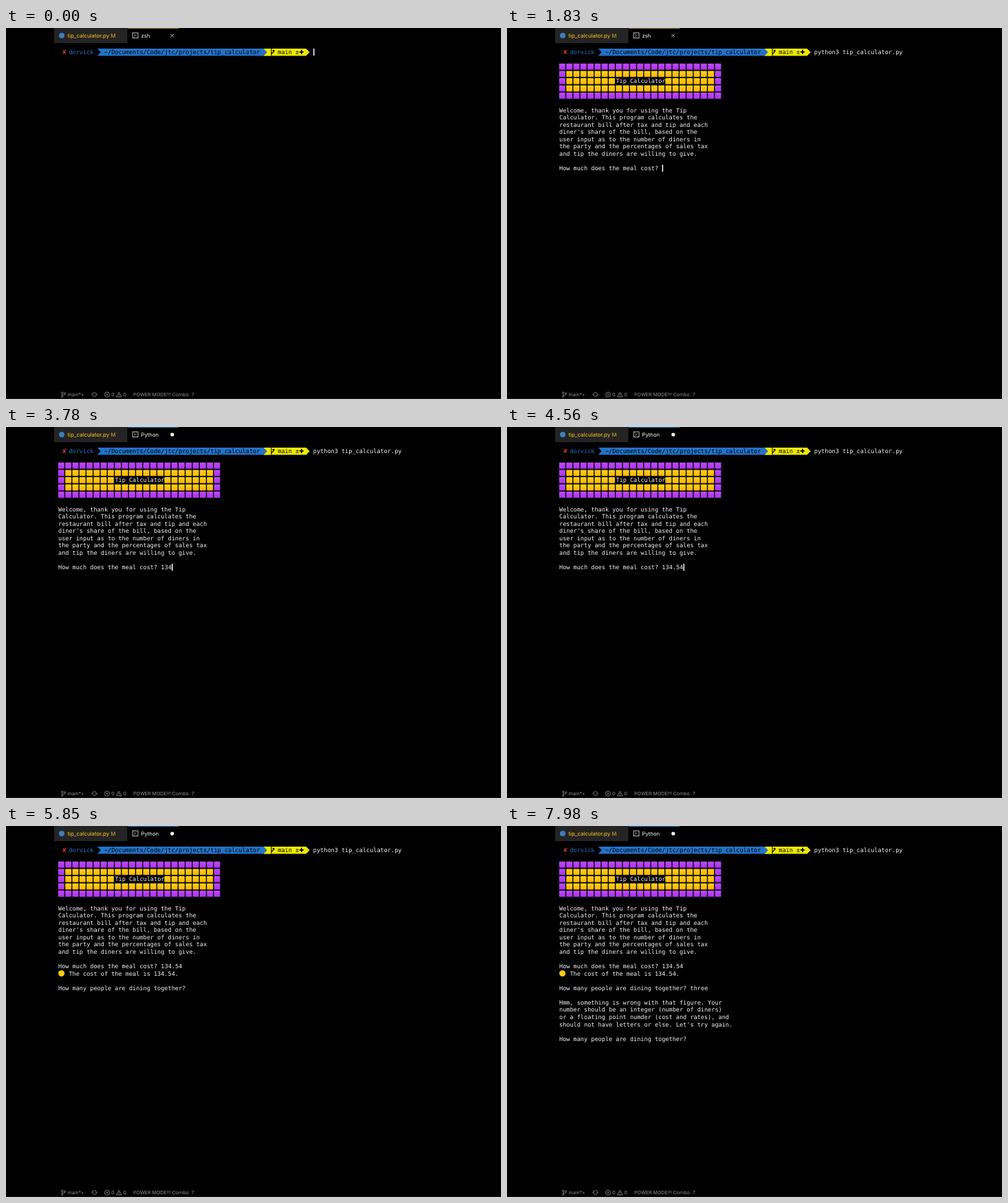
Write an HTML page that moves like this. It is 720 by 540 pixels and loops after 8000 ms.

```html
<!DOCTYPE html>
<html lang="en">
<head>
<meta charset="utf-8">
<title>Tip calculator in a terminal</title>
<style>
  html, body { margin: 0; width: 100%; height: 100%; overflow: hidden; background: #000; }
  svg { display: block; width: 720px; height: 540px; }
  text { white-space: pre; text-rendering: geometricPrecision; }
  .mono { font: 8.555px "DejaVu Sans Mono", monospace; fill: #f4f4f4; }
  .tab { font: 7.7px Inter, sans-serif; fill: #fff; }
  .file { font-size: 7.92px; fill: #fcc91c; }
  .status { font: 7.05px Inter, sans-serif; fill: #929292; }
  .icon { fill: none; stroke: #929292; stroke-width: .8; }
  .white { stroke: #e8e8e8; }
</style>
</head>
<body>
<svg id="stage" viewBox="0 0 720 540">
  <defs>
    <linearGradient id="purple" x2="0" y2="1">
      <stop stop-color="#bd4bff"/><stop offset="1" stop-color="#aa32ec"/>
    </linearGradient>
    <linearGradient id="gold" x2="0" y2="1">
      <stop stop-color="#ffd21c"/><stop offset="1" stop-color="#f7b500"/>
    </linearGradient>
  </defs>

  <!-- tabs -->
  <rect x="70" width="106.5" height="22" fill="#242424"/>
  <circle cx="81" cy="11" r="4" fill="#3f7db5"/>
  <text class="tab file" x="89.5" y="13.8">tip_calculator.py</text>
  <text class="tab" x="152.4" y="13.6" style="fill:#e0b01c">M</text>
  <rect id="edge" x="177" width="74" height="1"/>
  <rect class="icon white" x="184.2" y="7" width="7.8" height="7.6"/>
  <path class="icon white" d="M186.3 8.9l2 1.9-2 1.9"/>
  <text class="tab" id="title" x="196.5" y="13.8"></text>
  <path class="icon white" id="close" stroke-width="1" d="M239.3 8.7l4.8 4.8m0-4.8l-4.8 4.8"/>
  <circle id="dot" cx="241.8" cy="11" r="2.6" fill="#fff"/>

  <!-- status bar -->
  <g class="icon">
    <circle cx="81.7" cy="531" r="1.2"/><circle cx="81.7" cy="536.6" r="1.2"/><circle cx="85.6" cy="531.9" r="1.2"/>
    <path d="M81.7 532.2v3.2m3.9-2.3c0 1.8-3.9.8-3.9 2.3"/>
    <path d="M125.5 533a3.2 3.2 0 0 1 6.1-.4m.2 1.2a3.2 3.2 0 0 1-6.1.6m-1.5-.3l1.3-1.5 1.5 1.3m3.1-1.1l1.6 1.3 1.2-1.5"/>
    <circle cx="147" cy="533.6" r="3.6"/><path d="M145.5 532.1l3 3m0-3l-3 3"/>
    <path d="M164.3 530l3.8 6.9h-7.6zm0 2.5v2.2m0 .7v.8"/>
  </g>
  <text class="status" x="89.6" y="536.3">main*+</text>
  <text class="status" x="153.2" y="536.3">0</text>
  <text class="status" x="170.5" y="536.3">0</text>
  <text class="status" x="185" y="536.3">POWER MODE!!! Combo: 7</text>
  <rect y="539" width="720" height="1" fill="#131313"/>

  <g id="term"></g>
  <rect id="cursor" width="1.6" height="10.3" fill="#f0f0f0"/>
</svg>

<script>
const LOOP = 8000, COL = 5.15, ROW = 10.56, LEFT = 76, TOP = 30;
const BLINK = 600;
const $ = id => document.getElementById(id);
const term = $('term');
const colX = c => LEFT + c * COL;
const rowY = r => TOP + r * ROW;

function add(parent, tag, attrs, text = '') {
  const el = document.createElementNS('http://www.w3.org/2000/svg', tag);
  for (const k in attrs) el.setAttribute(k, attrs[k]);
  el.textContent = text;
  return parent.appendChild(el);
}
function write(parent, col, row, text, style = '') {
  return add(parent, 'text', { class: 'mono', x: colX(col), y: rowY(row) + 8.1, style }, text);
}
function lines(parent, row, list) {
  list.forEach((text, i) => write(parent, 0, row + i, text));
}
const group = () => add(term, 'g', {});

// Powerline prompt: each segment ends in a one-column arrow
function segment(from, to, fill) {
  const a = colX(from), b = colX(to), h = 10.4;
  add(term, 'path', { fill, d: `M${a} ${TOP}H${b}l${COL} ${h / 2}l${-COL} ${h / 2}H${a}l${COL} ${-h / 2}z` });
}
const blue = '#2472c8', yellow = '#eeea00';
const symbol = 'font-family:"DejaVu Sans",sans-serif;fill:';
add(term, 'rect', { x: colX(58), y: TOP, width: COL * 2, height: 10.4, fill: yellow });
segment(58, 70, yellow);
segment(11, 58, blue);
write(term, 1, 0, '✘', symbol + '#d83434');
write(term, 3, 0, 'dorvick', `fill:${blue}`);
write(term, 13, 0, '~/Documents/Code/jtc/projects/tip_calculator', 'fill:#000');
add(term, 'path', {
  fill: 'none', stroke: '#000', 'stroke-width': 1.1,
  d: 'M386 30v10.2m0-2c0-2 3.2-1.4 3.2-3.8v-2m-1.4 1.5l1.4-1.7 1.4 1.7'
});
write(term, 62, 0, 'main ±', 'fill:#000');
write(term, 68, 0, '✚', symbol + '#000');
const command = write(term, 72, 0, '');

// Banner and welcome text
const intro = group();
for (let r = 0; r < 5; r++) {
  for (let c = 0; c < 23; c++) {
    if (r === 2 && c > 7 && c < 15) continue;
    const border = r % 4 === 0 || c % 22 === 0;
    add(intro, 'rect', {
      x: colX(c * 2) - .1, y: rowY(r + 2) + .7, width: 8.9, height: 8.9, rx: .8,
      fill: `url(#${border ? 'purple' : 'gold'})`
    });
  }
}
write(intro, 16, 4, 'Tip Calculator');
lines(intro, 8, [
  'Welcome, thank you for using the Tip',
  'Calculator. This program calculates the',
  'restaurant bill after tax and tip and each',
  "diner's share of the bill, based on the",
  'user input as to the number of diners in',
  'the party and the percentages of sales tax',
  'and tip the diners are willing to give.',
  '',
  'How much does the meal cost? '
]);
const cost = write(intro, 29, 16, '');

const people = group();
add(people, 'circle', { cx: 80.6, cy: rowY(17) + 5, r: 4.5, fill: '#ffca10' });
write(people, 3, 17, 'The cost of the meal is 134.54.');
write(people, 0, 19, 'How many people are dining together? ');
const diners = write(people, 37, 19, '');

const retry = group();
lines(retry, 21, [
  'Hmm, something is wrong with that figure. Your',
  'number should be an integer (number of diners)',
  'or a floating point numder (cost and rates), and',
  "should not have letters or else. Let's try again.",
  '',
  'How many people are dining together? '
]);

// Inputs: the cursor row and column, the text and its key times
const inputs = [
  { start: -240, el: command, col: 72, row: 0, text: 'python3 tip_calculator.py', keys: [1230] },
  { start: 1650, col: 0, row: 1, text: '', keys: [] },
  { start: 1740, blinkFrom: 1650, el: cost, col: 29, row: 16, text: '134.54', keys: [3360, 3570, 3780, 3990, 4200, 4410] },
  { start: 4890, el: diners, col: 37, row: 19, text: 'three', keys: [6300, 6420, 6570, 6720, 6870] },
  { start: 7050, col: 37, row: 26, text: '', keys: [] }
];

const show = (el, on) => el.setAttribute('visibility', on ? 'visible' : 'hidden');

function draw(t) {
  let active;
  for (const input of inputs) {
    const done = input.keys.filter(k => k <= t).length;
    const typed = input.keys.length === 1 ? (done ? input.text : '') : input.text.slice(0, done);
    if (input.el) input.el.textContent = typed;
    if (t >= input.start) active = { input, done, typed };
  }
  const { input, done, typed } = active;
  const lastKey = done ? input.keys[done - 1] : input.blinkFrom ?? input.start;
  $('cursor').setAttribute('x', colX(input.col + typed.length) + .2);
  $('cursor').setAttribute('y', rowY(input.row));
  show($('cursor'), (t - lastKey) % (2 * BLINK) < BLINK);

  show(intro, t >= 1740);
  show(people, t >= 4890);
  show(retry, t >= 7050);

  const running = t >= 1860;
  $('title').textContent = running ? 'Python' : 'zsh';
  show($('close'), !running);
  show($('dot'), running);
  $('edge').setAttribute('fill', t >= 2550 ? '#1a76b8' : '#8c7c14');
}

function tick() {
  draw(performance.now() % LOOP);
  requestAnimationFrame(tick);
}
tick();
</script>
</body>
</html>
```
